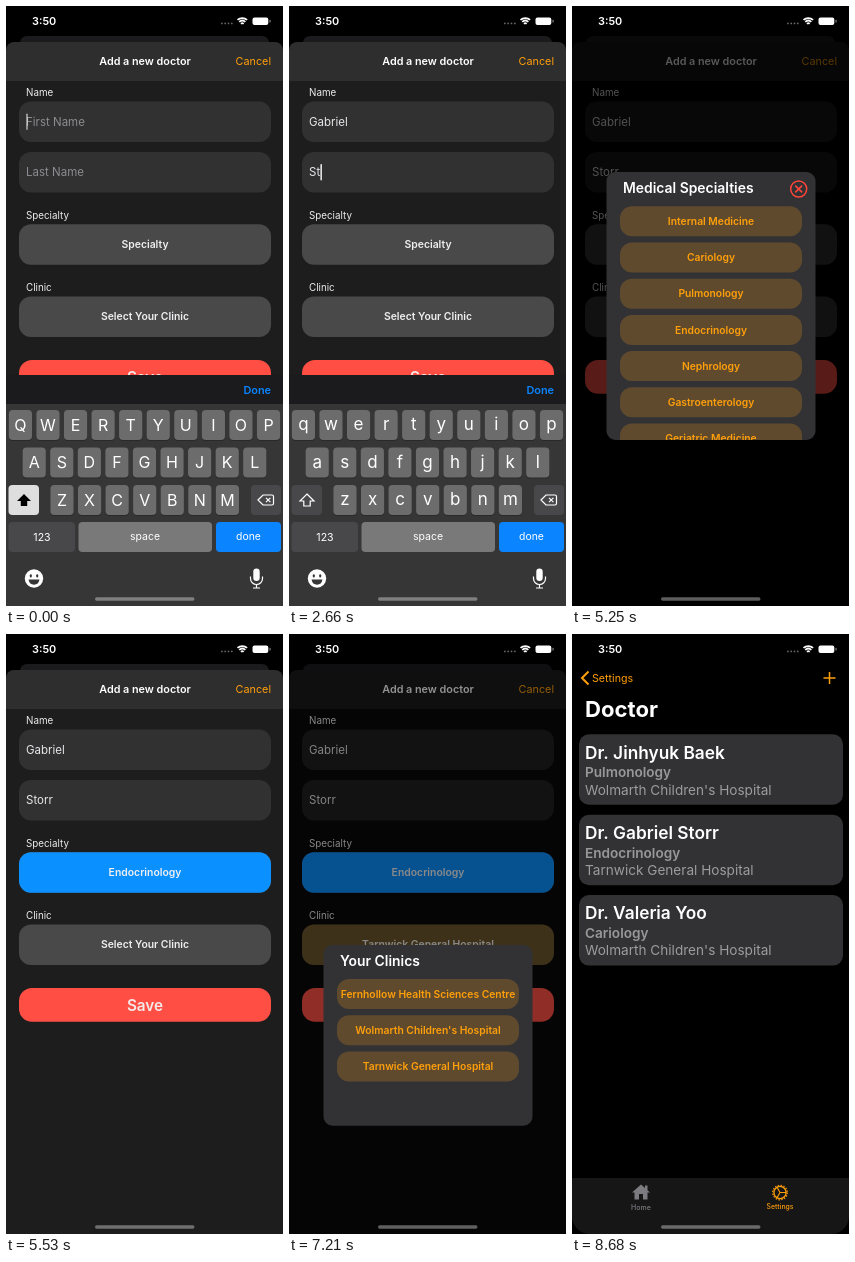
Write an HTML page with a canvas that moves like this. It is 277 by 600 pixels and loops after 8750 ms.

```html
<!DOCTYPE html>
<html lang="en">
<head>
<meta charset="utf-8">
<title>Add a new doctor</title>
<style>
html, body { margin: 0; width: 100%; height: 100%; overflow: hidden; background: #000; }
canvas { display: block; width: 277px; height: 600px; }
</style>
</head>
<body>
<canvas id="stage"></canvas>
<script>
const W = 277, H = 600, LOOP = 8750, STEP = 70, DIM = 0.65;
const canvas = document.getElementById('stage'), c = canvas.getContext('2d');
const dpr = window.devicePixelRatio || 1;
canvas.width = W * dpr;
canvas.height = H * dpr;

const ORANGE = '#ff9f0a', BLUE = '#0a84ff', RED = '#ff4f44', WHITE = '#fff';
const FIRST = 'Gabriel', LAST = 'Storr';
const CLINICS = ['Fernhollow Health Sciences Centre', "Wolmarth Children's Hospital", 'Tarnwick General Hospital'];
const SPECIALTIES = ['Internal Medicine', 'Cariology', 'Pulmonology', 'Endocrinology',
  'Nephrology', 'Gastroenterology', 'Geriatric Medicine'];
const DOCTORS = [
  ['Dr. Jinhyuk Baek', SPECIALTIES[2], CLINICS[1]],
  [`Dr. ${FIRST} ${LAST}`, SPECIALTIES[3], CLINICS[2]],
  ['Dr. Valeria Yoo', SPECIALTIES[1], CLINICS[1]]
];
const FIRST_KEYS = [910, 1260, 1540, 1610, 1750, 1820, 2030];
const LAST_KEYS = [2450, 2660, 2800, 2940, 3080];

const ramp = (t, a, b) => Math.min(1, Math.max(0, (t - a) / (b - a)));
const ease = p => p * p * (3 - 2 * p);
const mix = (a, b, p) => a + (b - a) * p;
const grey = v => `rgb(${v},${v},${v * 1.06})`;
const white = a => `rgba(255,255,255,${a})`;
const typed = (word, times, t) => word.slice(0, times.filter(k => t >= k).length);
const spring = s => Math.exp(-8.4 * s) * (Math.cos(10.6 * s) + 0.79 * Math.sin(10.6 * s));

function box(x, y, w, h, r, fill) {
  c.beginPath();
  c.roundRect(x, y, w, h, r);
  c.fillStyle = fill;
  c.fill();
}

// y is the middle of the capital letters
function text(s, x, y, size, fill, weight = 400, align = 'left') {
  c.font = `${weight} ${size}px Inter, "Open Sans", sans-serif`;
  c.textAlign = align;
  c.fillStyle = fill;
  c.fillText(s, x, y + size * 0.36);
}

function line(points, color, width) {
  c.beginPath();
  points.forEach(([x, y]) => c.lineTo(x, y));
  c.strokeStyle = color;
  c.lineWidth = width;
  c.stroke();
}

function arc(x, y, r, color, width, from = 0, to = 2 * Math.PI) {
  c.beginPath();
  c.arc(x, y, r, from, to);
  c.strokeStyle = color;
  c.lineWidth = width;
  c.stroke();
}

function shape(path, x, y, fill, stroke) {
  const p = new Path2D(path);
  c.save();
  c.translate(x, y);
  if (fill) { c.fillStyle = fill; c.fill(p); }
  if (stroke) { c.strokeStyle = stroke; c.lineWidth = 1.2; c.stroke(p); }
  c.restore();
}

function statusBar() {
  text('3:50', 26, 15.3, 10.9, WHITE, 600);
  for (let i = 0; i < 4; i++) box(215 + i * 3.3, 16.5, 1.8, 1.8, 1, '#666');
  for (const r of [2, 4.6, 7.2]) arc(236.3, 19.3, r, WHITE, 1.7, -2.3, -0.84);
  box(246.5, 11.5, 15.8, 7.4, 2, WHITE);
  box(263.4, 13.8, 1.3, 2.8, 0.6, '#777');
}

function tabBar() {
  box(0, 544, W, 56, 0, '#161617');
  shape('M0-8L9 0H6.5V7H2V1.5H-2V7H-6.5V0H-9ZM4-7H6.5V-2L4-4Z', 69, 558.5, '#7c7c80');
  text('Home', 69, 573, 7, '#7c7c80', 500, 'center');
  c.setLineDash([1.4, 1.5]);
  arc(208, 558.5, 7.3, ORANGE, 1.2);
  c.setLineDash([]);
  arc(208, 558.5, 6.1, ORANGE, 1.3);
  for (let i = 0; i < 3; i++) {
    const a = i * 2.094, x = Math.cos(a), y = Math.sin(a);
    line([[208, 558.5], [208 + 6 * x, 558.5 + 6 * y]], ORANGE, 1.1);
  }
  text('Settings', 208, 573, 6.9, ORANGE, 500, 'center');
}

// p: 0 behind the open sheet, 1 in front
function listPage(p) {
  const s = mix(0.9, 1, p);
  const tint = `rgb(${mix(165, 255, p)},${mix(150, 159, p)},${mix(135, 10, p)})`;
  c.save();
  c.translate(W / 2 * (1 - s), 30 * (1 - p));
  c.scale(s, s);
  c.beginPath();
  c.roundRect(0, 0, W, H, [mix(8, 0, p), mix(8, 0, p), 18, 18]);
  c.clip();
  box(0, 0, W, H, 0, grey(mix(27, 0, p * p)));
  line([[16.5, 37.5], [10, 44], [16.5, 50.5]], tint, 2);
  text('Settings', 20, 44.3, 10.7, tint);
  line([[251.5, 44], [263.5, 44]], tint, 1.5);
  line([[257.5, 38], [257.5, 50]], tint, 1.5);
  text('Doctor', 13, 75.3, 22.1, WHITE, 700);
  DOCTORS.forEach(([name, specialty, clinic], i) => {
    const y = 100.3 + i * 80.4;
    box(7, y, 264, 70.5, 10, grey(mix(82, 50, p)));
    text(name, 13, y + 18, 17.3, WHITE, 600);
    text(specialty, 13, y + 38, 13.6, '#98989c', 600);
    text(clinic, 13, y + 55.5, 13.6, '#9c9ca0');
  });
  tabBar();
  c.restore();
}

function field(y, value, hint, focus) {
  box(13, y, 252, 40.5, 12, white(0.09));
  text(value || hint, 20, y + 20.3, 11.5, value ? '#e6e6e8' : '#8c8c90');
  if (focus > 0) {
    const x = 20.3 + c.measureText(value).width;
    box(x, y + 12, 1.4, 16.5, 0.7, white(focus));
  }
}

function choice(y, hint, value, color, p) {
  box(13, y, 252, 40.5, 12, white(0.195));
  c.globalAlpha = p;
  box(13, y, 252, 40.5, 12, color);
  c.globalAlpha = 1;
  text(p > 0 ? value : hint, 139, y + 20.2, 10.4, '#efeff0', 600, 'center');
}

function sheet(t, y, dim) {
  const blink = Math.max(1 - ramp(t, -70, 140), ramp(t, 350, 560)) *
    Math.max(1 - ramp(t, 3500, 3710), ramp(t, 3710, 3850));
  c.save();
  c.translate(0, y);
  box(0, 36, W, 600, [8, 8, 0, 0], grey(mix(28.5, 0, ramp(dim, 0, DIM))));
  box(0, 36, W, 39, [8, 8, 0, 0], white(0.075));
  text('Add a new doctor', 139, 55, 10.8, WHITE, 600, 'center');
  text('Cancel', 265, 55, 10.8, ORANGE, 400, 'right');
  text('Name', 20, 86.3, 9.8, '#ededee');
  field(95.5, typed(FIRST, FIRST_KEYS, t), 'First Name', t < 2170 ? blink : 0);
  field(146, typed(LAST, LAST_KEYS, t), 'Last Name', t >= 2170 && t < 4060 ? blink : 0);
  text('Specialty', 20, 209, 9.8, '#ededee');
  choice(218.3, 'Specialty', SPECIALTIES[3], '#0b90ff', ramp(t, 5250, 5530));
  text('Clinic', 20, 281.3, 9.8, '#ededee');
  choice(290.5, 'Select Your Clinic', CLINICS[2], '#d69110', ramp(t, 7140, 7350));
  box(13, 354, 252, 33.7, 13, RED);
  text('Save', 139, 371.3, 15.3, '#f4e9e8', 600, 'center');
  c.restore();
}

function keyRow(letters, x, y, caps) {
  [...letters].forEach((ch, i) => {
    const cx = x + i * 27.57;
    box(cx - 11.6, y + 1, 23.2, 30, 4, '#29292a');
    box(cx - 11.6, y, 23.2, 30, 4, '#6c6c6d');
    if (caps) text(ch, cx, y + 15, 16, WHITE, 400, 'center');
    else text(ch.toLowerCase(), cx, y + 14, 17, WHITE, 400, 'center');
  });
}

function keyboard(offset, caps) {
  c.save();
  c.translate(0, offset);
  box(0, 369, W, 30, 0, '#1b1b1d');
  text('Done', 265, 384, 10.9, BLUE, 600, 'right');
  box(0, 398, W, 202, 0, '#363637');
  keyRow('QWERTYUIOP', 14.4, 404, caps);
  keyRow('ASDFGHJKL', 28.2, 441.5, caps);
  keyRow('ZXCVBNM', 56, 479, caps);
  box(2.5, 479, 30.5, 30, 4, caps ? '#dededf' : '#48484a');
  shape('M0-6.5L7 .5H3.2V5.5H-3.2V.5H-7Z', 18, 494.5, caps ? '#000' : null, caps ? null : WHITE);
  box(245, 479, 30, 30, 4, '#48484a');
  shape('M-8 0L-3-5H6Q7.5-5 7.5-3.5V3.5Q7.5 5 6 5H-3ZM0-2.2L4.4 2.2M4.4-2.2L0 2.2', 260, 494, null, WHITE);
  box(2.5, 516, 66.5, 30, 4, '#48484a');
  text('123', 36, 531, 10.6, WHITE, 400, 'center');
  box(72.5, 516, 133.5, 30, 4, '#79797a');
  text('space', 139, 530.5, 10.5, WHITE, 400, 'center');
  box(210, 516, 65, 30, 4, BLUE);
  text('done', 242.5, 530.5, 10.4, WHITE, 400, 'center');
  box(18.8, 563.3, 18.4, 18.4, 9.2, WHITE);
  box(23.8, 568.3, 2, 3.2, 1, '#363637');
  box(30.2, 568.3, 2, 3.2, 1, '#363637');
  shape('M-5.5 0H5.5Q4.5 5.2 0 5.2T-5.5 0Z', 28, 573.6, '#363637');
  box(247.3, 562.5, 6.4, 12.5, 3.2, WHITE);
  shape('M-6-2V0A6 6 0 0 0 6 0V-2M0 6V9.5M-3.5 9.5H3.5', 250.5, 572.5, null, WHITE);
  c.restore();
}

function popup(title, rows, top, offset, closable) {
  c.save();
  c.translate(0, offset);
  c.beginPath();
  c.roundRect(34.5, top, 209, H - 2 * top, 9);
  c.clip();
  box(34, top, 210, H, 0, '#323234');
  text(title, 51, top + 16.3, 13.9, WHITE, 600);
  if (closable) {
    const x = 226.7, y = top + 17;
    arc(x, y, 8, '#ff453a', 1.5);
    line([[x - 3.4, y - 3.4], [x + 3.4, y + 3.4]], '#ff453a', 1.5);
    line([[x - 3.4, y + 3.4], [x + 3.4, y - 3.4]], '#ff453a', 1.5);
  }
  rows.forEach((row, i) => {
    const y = top + 34.3 + i * 36.2;
    box(48, y, 182, 30, 12, '#5f4a2e');
    text(row, 139, y + 15, 10.3, ORANGE, 600, 'center');
  });
  c.restore();
}

function slide(t, top, start, leave, gone) {
  return (H - top) * (t < leave ? spring((t - start) / 1000) : ease(ramp(t, leave, gone)));
}

function dimAt(t) {
  if (t < 6020) return DIM * ramp(t, 3990, 4130) * (1 - ramp(t, 5250, 5530));
  return DIM * ramp(t, 5950, 6160) * (1 - ramp(t, 7140, 7350));
}

function draw(t) {
  c.setTransform(dpr, 0, 0, dpr, 0, 0);
  box(0, 0, W, H, 0, '#000');
  const dim = dimAt(t);
  const leaving = 1 - Math.pow(1 - ramp(t, 8190, 8680), 1.68);
  listPage(leaving);
  if (leaving < 1) sheet(t, 564 * leaving, dim);
  if (t < 4130) keyboard(231 * ramp(t, 3990, 4130), t < 910 || (t >= 2170 && t < 2450));
  if (dim) box(0, 30, W, H, 0, `rgba(0,0,0,${dim})`);
  if (t >= 4200 && t < 5530) popup('Medical Specialties', SPECIALTIES, 166, slide(t, 166, 4200, 5250, 5530), true);
  if (t >= 6020 && t < 7350) popup('Your Clinics', CLINICS, 209.5, slide(t, 209.5, 6020, 7140, 7350), false);
  statusBar();
  box(89, 591.3, 99.5, 3.4, 1.7, white(0.36));
}

function tick() {
  draw(Math.floor(performance.now() % LOOP / STEP) * STEP);
  requestAnimationFrame(tick);
}
tick();
</script>
</body>
</html>
```
